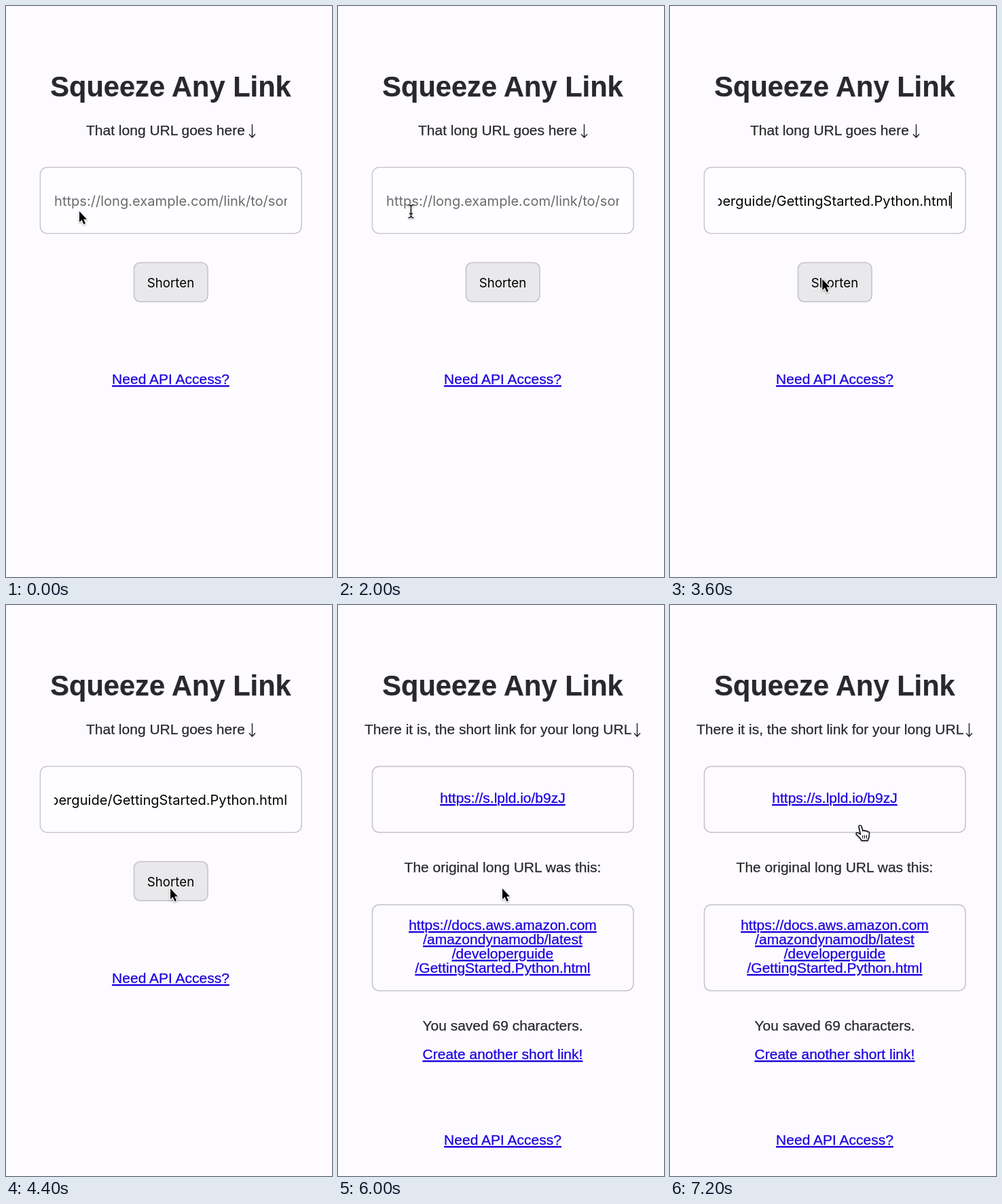
Write an HTML page that moves like this. It is 480x840 px and loops after 8 s.

```html
<!DOCTYPE html>
<html lang="en">
<head>
<meta charset="utf-8">
<title>Link shortener</title>
<style>
  html, body { margin: 0; width: 100%; height: 100%; overflow: hidden; background: #fdfbff; }
  svg { display: block; }
  text { font: 21px "Liberation Sans", Arial, sans-serif; fill: #29282b; stroke: #29282b; stroke-width: .25; }
  .title { font-size: 41.6px; font-weight: bold; }
  .mid { text-anchor: middle; }
  .link { fill: #1d00dd; stroke: #1d00dd; text-decoration: underline; text-decoration-thickness: 1.6px; text-anchor: middle; }
  .field { font: 20.1px Inter, sans-serif; fill: #000; stroke: none; }
  .hint { fill: #6b6b6e; }
  .button { font: 18.7px Inter, sans-serif; fill: #000; stroke: none; text-anchor: middle; }
  .box { fill: none; stroke: #c3c2c6; stroke-width: 1.5; }
  .down { fill: none; stroke: #29282b; stroke-width: 1.5; }
  #pointer { filter: drop-shadow(0 1px 1px #0005); }
  #arrow { stroke: #fff; stroke-width: 2.4; paint-order: stroke; stroke-linejoin: round; }
  #beam, #hand { fill: none; stroke: #000; stroke-width: 1.4; stroke-linejoin: round; }
</style>
</head>
<body>
<svg width="480" height="840" viewBox="0 0 480 840">
  <defs>
    <path id="down" class="down" d="M0 174V193.500M-4.500 188.500L0 193.500L4.500 188.500"/>
    <path id="ibeam" d="M-4 -9.500Q0 -9.500 0 -6.500V6.500Q0 9.500 -4 9.500M4 -9.500Q0 -9.500 0 -6.500M4 9.500Q0 9.500 0 6.500M-2.500 3.500H2.500"/>
  </defs>
  <text class="title mid" x="242.5" y="133">Squeeze Any Link</text>
  <rect class="box" x="50.5" y="237.5" width="384.5" height="97" rx="10"/>

  <g id="form">
    <text x="118" y="189.5">That long URL goes here</text>
    <use href="#down" x="362.5"/>
    <rect x="51.2" y="238.2" width="383" height="95.6" rx="9.3" fill="#fefdff"/>
    <svg x="71" y="260" width="343" height="50">
      <text id="hint" class="field hint" x="0" y="33.5">https://long.example.com/link/to/something</text>
      <text id="value" class="field" x="343" y="33.5" text-anchor="end">https://docs.aws.amazon.com/amazondynamodb/latest/developerguide/GettingStarted.Python.html</text>
    </svg>
    <rect id="caret" y="274" width="1.5" height="24"/>
    <rect class="box" x="188.5" y="377.5" width="108.5" height="57.5" rx="9" style="fill:#e9e8ea"/>
    <text class="button" x="242.5" y="413.5">Shorten</text>
    <text class="link" x="242.5" y="556">Need API Access?</text>
  </g>

  <g id="result">
    <text x="39" y="189.5">There it is, the short link for your long URL</text>
    <use href="#down" x="440.5"/>
    <text class="link" x="242.5" y="291">https://s.lpld.io/b9zJ</text>
    <text class="mid" x="242.5" y="393">The original long URL was this:</text>
    <rect class="box" x="50.5" y="441" width="384.5" height="126.5" rx="10"/>
    <text class="link" x="242.5" y="478">https://docs.aws.amazon.com</text>
    <text class="link" x="242.5" y="499">/amazondynamodb/latest</text>
    <text class="link" x="242.5" y="520">/developerguide</text>
    <text class="link" x="242.5" y="541">/GettingStarted.Python.html</text>
    <text class="mid" x="242.5" y="626">You saved 69 characters.</text>
    <text class="link" x="242.5" y="668">Create another short link!</text>
    <text class="link" x="242.5" y="794">Need API Access?</text>
  </g>

  <g id="pointer">
    <path id="arrow" d="M0 0V16L3.600 12.600L6.400 19L9 17.900L6.300 11.700H11Z"/>
    <g id="beam">
      <use href="#ibeam" style="stroke:#fff;stroke-width:3"/>
      <use href="#ibeam"/>
    </g>
    <g id="hand">
      <path style="fill:#fff" d="M-2 1.500C-2 -1 1.500 -1 2 1.500L4 8C4.500 6.500 7 6.500 7.500 8.500C8 7 10.500 7.500 10.700 9.500C11.500 8.300 13.500 9 13.500 11L13 16C13 18 11.500 19 11.200 22H2C1.500 19.500 -2 17 -5.500 13C-7 11 -4.500 9.500 -2.500 11L.5 13Z"/>
      <path style="stroke-width:1.1" d="M3.800 14V19M6.600 14V19M9.400 14V19"/>
    </g>
  </g>
</svg>
<script>
  const LOOP = 8000, STEP = 200;
  const $ = id => document.getElementById(id);
  const show = (id, on) => $(id).style.display = on ? "" : "none";
  const within = (t, from, to) => t >= from && t < to;

  // Smooth travel between two points
  function glide(t, start, end, from, to) {
    const p = Math.min(1, Math.max(0, (t - start) / (end - start)));
    const k = p * p * (3 - 2 * p);
    return from.map((v, i) => v + (to[i] - v) * k);
  }

  function pointerAt(t) {
    if (t < 200) return [108, 302];
    if (t < 6000) return glide(t, 2920, 3800, [107.5, 302], [242, 417]);
    if (t < 7200) return glide(t, 6050, 6950, [242, 417], [280, 290]);
    return [280, 324.5];
  }

  function draw(now) {
    const t = Math.floor(now % LOOP / STEP) * STEP;
    const done = t >= 5000, pasted = t >= 2600;
    const [x, y] = pointerAt(t);
    const hand = t >= 6600 && (y < 298 || t >= 7200);
    const beam = within(t, 200, 5000) && y < 335;

    show("form", !done);
    show("result", done);
    show("hint", !pasted);
    show("value", pasted);
    show("caret", within(t, 1400, 2000) || within(t, 2400, 3000) || within(t, 3600, 4200));
    $("caret").setAttribute("x", pasted ? 413.5 : 72);

    show("hand", hand);
    show("beam", beam);
    show("arrow", !hand && !beam);
    $("pointer").setAttribute("transform", `translate(${x} ${y})`);
  }

  const begin = performance.now();
  function tick() {
    draw(performance.now() - begin);
    requestAnimationFrame(tick);
  }
  tick();
</script>
</body>
</html>
```
